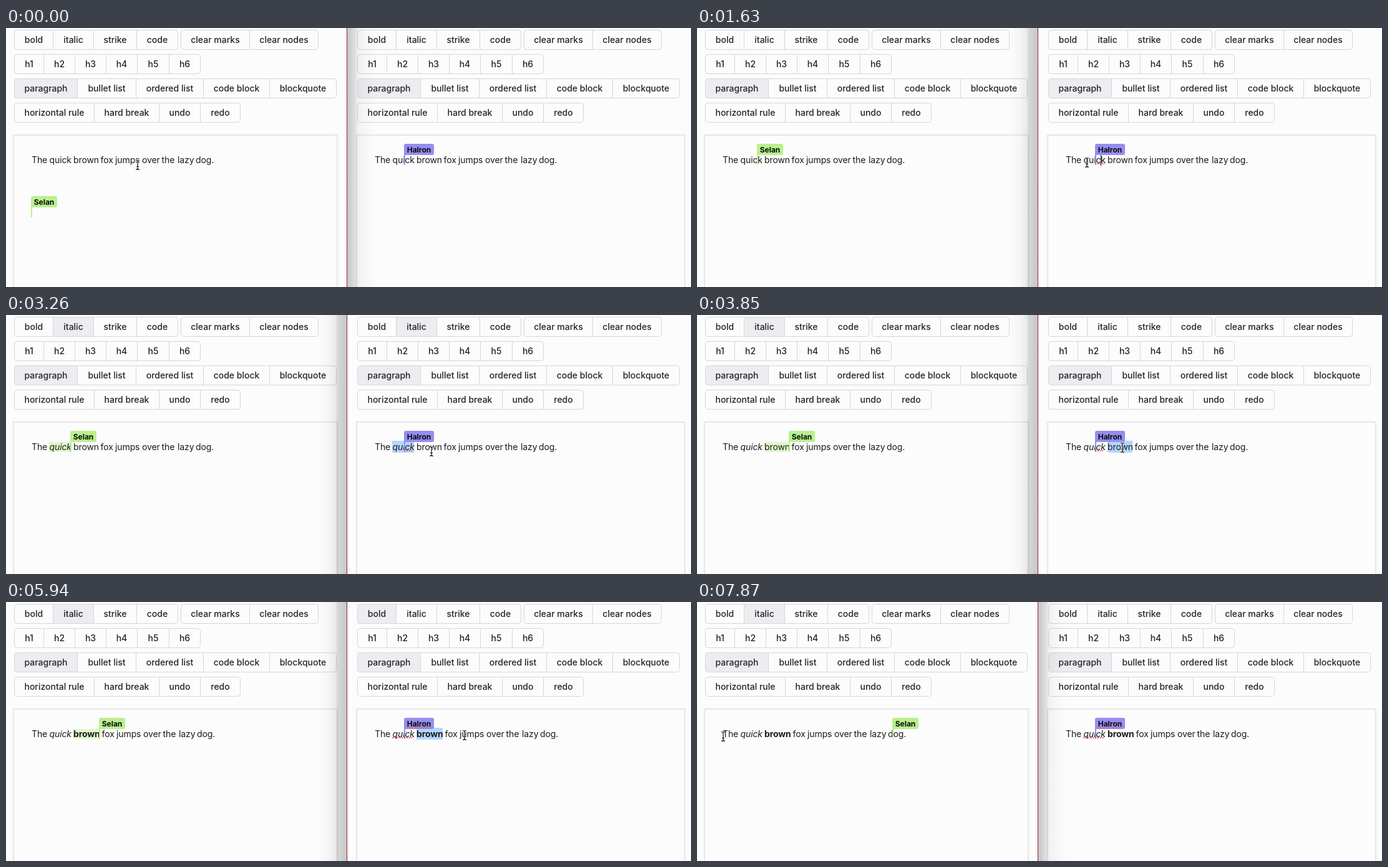
Write an HTML page that moves like this. It is 1098 px wide and 416 px high and loops after 8000 ms.

```html
<!DOCTYPE html>
<html lang="en">
<head>
<meta charset="utf-8">
<title>Collaborative editing</title>
<style>
html, body { margin: 0; width: 100%; height: 100%; overflow: hidden; background: #fcfcfd; }
svg { display: block; width: 100%; height: 100%; }
text { font: 14px Inter, "Open Sans", sans-serif; letter-spacing: -.1px; fill: #1b1b1d; white-space: pre; }
.button { font-weight: 500; text-anchor: middle; fill: #222327; letter-spacing: 0; }
.name { font-size: 12px; font-weight: 700; text-anchor: middle; fill: #0d0d0d; letter-spacing: 0; }
.italic { font-style: italic; }
.bold { font-weight: 700; }
</style>
</head>
<body>
<svg viewBox="0 0 1098 416">
  <defs>
    <linearGradient id="shadeLeft">
      <stop offset="0" stop-opacity="0"/>
      <stop offset=".38" stop-opacity=".025"/>
      <stop offset=".66" stop-opacity=".08"/>
      <stop offset=".67" stop-opacity=".14"/>
      <stop offset="1" stop-opacity=".21"/>
    </linearGradient>
    <linearGradient id="shadeRight">
      <stop offset="0" stop-opacity=".22"/>
      <stop offset=".3" stop-opacity=".1"/>
      <stop offset=".33" stop-opacity=".05"/>
      <stop offset=".6" stop-opacity=".02"/>
      <stop offset="1" stop-opacity="0"/>
    </linearGradient>
  </defs>
  <rect width="1098" height="416" fill="#fcfcfd"/>
  <g id="pages"></g>
  <rect id="leftShadow" x="499" width="47" height="416" fill="url(#shadeLeft)"/>
  <rect id="rightShadow" x="547" width="48" height="416" fill="url(#shadeRight)"/>
  <rect x="546" width="1" height="416" fill="#98203c"/>
  <g id="cursor"></g>
</svg>
<script>
const LOOP = 8000, OFFSET = 550;
const GREEN = "#b9f18d", PURPLE = "#958df1";

// Button groups: top, cell edges, labels
const GROUPS = [
  [3, [13, 75, 140, 209, 275], ["bold", "italic", "strike", "code"]],
  [3, [280, 390, 500], ["clear marks", "clear nodes"]],
  [42, [13, 60, 110, 160, 210, 261, 311], ["h1", "h2", "h3", "h4", "h5", "h6"]],
  [81, [13, 114, 208, 316, 422, 529], ["paragraph", "bullet list", "ordered list", "code block", "blockquote"]],
  [120, [13, 141, 245, 311, 375], ["horizontal rule", "hard break", "undo", "redo"]],
];
const WORDS = [["The", 41], ["quick", 69.5], ["brown", 108], ["fox", 151.5], ["jumps", 175],
  ["over", 218], ["the", 249.5], ["lazy", 275], ["dog.", 304]];

// Tracks hold [start time, ...values]; each value stays until the next start
const POINTER = [
  [0, 211, 220, "beam"], [150, 327, 225, "arrow"], [440, 470, 235, "arrow"],
  [590, 620, 241, "arrow"], [740, 737, 245, "arrow"], [880, 690, 228, "arrow"],
  [1030, 660, 216, "beam"], [1180, 648, 214, "beam"], [1480, 634, 215, "beam"],
  [1630, 625, 216, "beam"], [2960, 641, 219, "beam"], [3110, 665, 223, "beam"],
  [3260, 682, 219, "beam"], [3410, 682, 215, "beam"], [3550, 682, 213, "beam"],
  [5650, 692, 214, "beam"], [5800, 735, 214, "beam"], [5950, 790, 213, "beam"],
  [6090, 838, 213, "beam"], [6240, 863, 213, "beam"], [6680, 560, 225, "arrow"],
  [6830, 146, 224, "arrow"], [7430, 120, 226, "beam"], [7580, 84, 222, "beam"],
  [7730, 54, 218, "beam"], [7870, 42, 216, "beam"],
];
const PEER = [[0, 40, 270], [1180, 96, 186], [1780, 103, 186], [3550, 131, 186],
  [3850, 147, 186], [5500, 149, 186], [6380, 313, 186]];
const SELECTION = [[0], [1780, 69, 35], [3550], [3850, 108, 40], [5500, 108, 42], [6380]];
const CARET = [[0], [740, 591, 287], [1180, 647, 204], [1780]];
const SQUIGGLE = [[0], [1480, 638, 654], [2520, 638, 651], [4900, 619, 652]];

const at = (track, t) => track.findLast(key => key[0] <= t).slice(1);
const within = (t, from, to = LOOP) => t >= from && t < to;
const $ = id => document.getElementById(id);
const box = (x, y, w, h, fill, extra = "") =>
  `<rect x="${x}" y="${y}" width="${w}" height="${h}" fill="${fill}" ${extra}/>`;
const label = (x, y, s, cls = "") => `<text x="${x}" y="${y}" class="${cls}">${s}</text>`;

function buttonGroup([top, edges, names], active) {
  const first = edges[0], last = edges.at(-1);
  let out = box(first + .5, top + .5, last - first, 31, "#fcfcfd", 'rx="4"'), lines = "";
  names.forEach((name, i) => {
    const x = edges[i], w = edges[i + 1] - x;
    if (active.includes(name)) {
      out += i ? box(x + .5, top + .5, w, 31, "#ededf1")
        : `<path d="M${x + w + .5} ${top + .5}v31h${4 - w}q-4 0-4-4v-23q0-4 4-4z" fill="#ededf1"/>`;
    }
    if (i) lines += `M${x + .5} ${top + .5}v31`;
    out += label(x + w / 2 + .5, top + 21, name, "button");
  });
  return out + `<path d="${lines}" stroke="#d6d6d9"/>` +
    box(first + .5, top + .5, last - first, 31, "none", 'rx="4" stroke="#d6d6d9"');
}

function nameTag(x, y, w, color, name) {
  return box(x, y + 17, 2, 17, color) +
    `<path d="M${x} ${y + 18}v-15q0-3 3-3h${w - 6}q3 0 3 3v12q0 3-3 3z" fill="${color}"/>` +
    label(x + w / 2, y + 14, name, "name");
}

function page(t, width, active, marks, overlay) {
  const bold = t >= 5500, italic = t >= 2520;
  const words = WORDS.map(([word, x], i) => label(x + (bold && i > 2 ? 2 : 0), 217, word,
    i === 1 && italic ? "italic" : i === 2 && bold ? "bold" : "")).join("");
  return GROUPS.map(group => buttonGroup(group, active)).join("") +
    box(12, 172, width, 260, "#fcfcfc", 'stroke="#000" stroke-opacity=".05" stroke-width="3"') +
    box(12.5, 172.5, width - 1, 260, "#fcfcfc", 'stroke="#e2e2e4"') +
    marks + words + overlay;
}

function dots(from, to, y) {
  return `<path d="M${from} ${y}H${to}" stroke="#e8636c" stroke-width="2" stroke-dasharray="2.2 1.6"/>`;
}

function pointer([x, y, kind]) {
  const shape = kind === "arrow"
    ? '<path d="M.5 0v14.5l3.3-3.1 2.5 5.6 2.3-1-2.4-5.4h4.3z" stroke="#fff" stroke-width="1.2" stroke-linejoin="round" paint-order="stroke"/>'
    : ["#fff", "#111"].map((color, i) =>
      `<path d="M-3-7.5q3 0 3 2v11q0 2-3 2M3-7.5q-3 0-3 2v11q0 2 3 2M-2 2.5h4" fill="none" stroke="${color}" stroke-width="${i ? 1.2 : 2.6}"/>`).join("");
  return `<g transform="translate(${x} ${y})">${shape}</g>`;
}

function render(t) {
  const [peerX, peerY] = at(PEER, t);
  const [selX, selW] = at(SELECTION, t);
  const [caretX, caretY] = at(CARET, t);
  const [dotsFrom, dotsTo] = at(SQUIGGLE, t);
  const rightActive = within(t, 740, 7130);

  const leftButtons = ["paragraph"], rightButtons = ["paragraph"];
  if (t >= 2520) leftButtons.push("italic");
  if (within(t, 2520, 3550)) rightButtons.push("italic");
  if (within(t, 5500, 6380)) rightButtons.push("bold");

  const left = page(t, 519, leftButtons,
    selX ? box(selX, 204, selW, 16, GREEN, 'opacity=".44"') : "",
    nameTag(peerX, peerY, 42, GREEN, "Selan"));

  let overlay = nameTag(638 - OFFSET, 186, 48, PURPLE, "Halron");
  if (dotsFrom) overlay += dots(dotsFrom - OFFSET, dotsTo - OFFSET, 218);
  if (t >= 4900) overlay += dots(643 - OFFSET, 681 - OFFSET, 202);
  if (caretX) overlay += box(caretX - OFFSET, caretY, 1, 17, "#111");
  const right = page(t, 526, rightButtons,
    selX ? box(selX, 202, selW, 19, "#b3d7fe") : "", overlay);

  $("pages").innerHTML = left + `<g transform="translate(${OFFSET})">${right}</g>`;
  $("leftShadow").style.display = rightActive ? "" : "none";
  $("rightShadow").style.display = rightActive ? "none" : "";
  $("cursor").innerHTML = pointer(at(POINTER, t));
}

const start = performance.now();
function tick() {
  render((performance.now() - start) % LOOP);
  requestAnimationFrame(tick);
}
tick();
</script>
</body>
</html>
```
